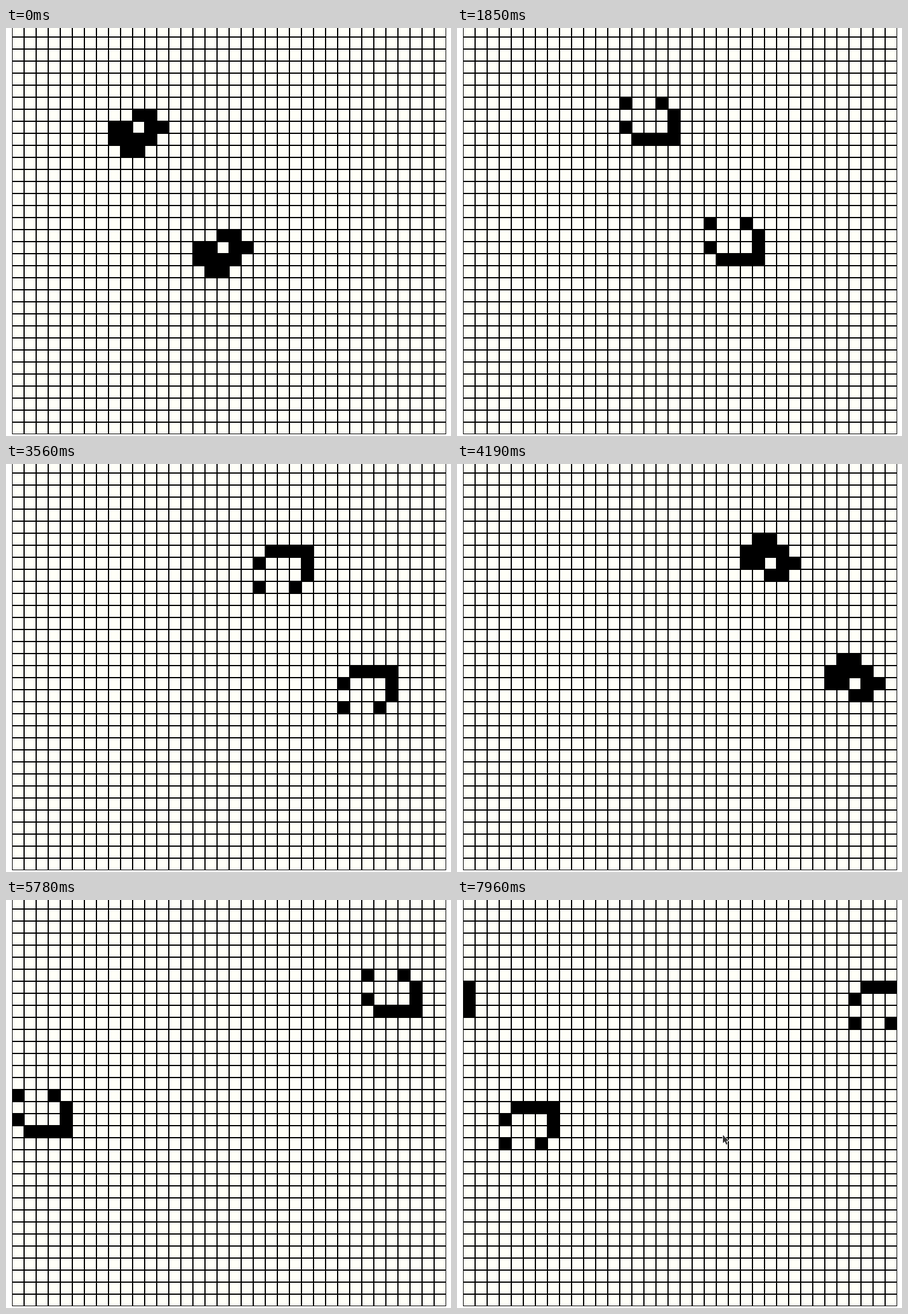
Recreate the animation shown at these times as an HTML page with a canvas. Size 738 by 678 pixels, loop 8 s.

```html
<!DOCTYPE html>
<html>
<head>
<meta charset="utf-8">
<style>
html, body { margin: 0; width: 100%; height: 100%; overflow: hidden; background: #fff; }
canvas { display: block; }
</style>
</head>
<body>
<canvas id="stage" width="738" height="678"></canvas>
<script>
const ctx = document.getElementById('stage').getContext('2d');
const LOOP = 8000, FPS = 27;
const CELL = 20, COLS = 36, LEFT = 10, TOP = 15, BOTTOM = 675;
const LAST_GEN = 49, FRAMES_PER_GEN = 3.315, DELAY = 12.83;

// Two shapes of the spaceship; the other two phases are their mirror images
const full = ['..##.', '##.##', '####.', '.##..'];
const open = ['.####', '#...#', '....#', '#..#.'];

// The life clock is only seen at whole display frames
function generation(t) {
  const frame = Math.floor((t + 5) * FPS / 1000);
  const gen = Math.floor((frame - DELAY) / FRAMES_PER_GEN);
  return Math.max(0, Math.min(LAST_GEN, gen));
}

function drawGrid() {
  for (let x = LEFT; x <= LEFT + COLS * CELL; x += CELL) ctx.fillRect(x - 1, 0, 2, BOTTOM);
  for (let y = TOP; y <= BOTTOM; y += CELL) ctx.fillRect(LEFT, y - 1, COLS * CELL, 2);
}

function drawShip(gen, col, row) {
  const shape = gen % 2 ? open : full;
  const flipped = gen % 4 > 1;
  const rows = flipped ? [...shape].reverse() : shape;
  const x0 = col + (gen >> 1), y0 = row - flipped;
  rows.forEach((line, y) => [...line].forEach((c, x) => {
    if (c === '#') {
      ctx.fillRect(LEFT + (x0 + x) % COLS * CELL - 1, TOP + (y0 + y) * CELL - 1, CELL + 2, CELL + 2);
    }
  }));
}

const arrow = new Path2D('M1 1.5V15L4.1 12.1L6.4 17.4L8.7 16.4L6.5 11.2H10.6Z');

function drawPointer(x, y) {
  ctx.save();
  ctx.translate(x, y);
  ctx.lineWidth = 1.5;
  ctx.lineJoin = 'round';
  ctx.strokeStyle = '#fff';
  ctx.stroke(arrow);
  ctx.fillStyle = '#333';
  ctx.fill(arrow);
  ctx.restore();
}

function draw(t) {
  const gen = generation(t);
  ctx.fillStyle = '#fff';
  ctx.fillRect(0, 0, 738, 678);
  ctx.save();
  ctx.beginPath();
  ctx.rect(LEFT, 0, COLS * CELL, BOTTOM);
  ctx.clip();
  ctx.fillStyle = '#fffff8';
  ctx.fillRect(LEFT, 0, COLS * CELL, BOTTOM);
  ctx.fillStyle = '#000';
  drawGrid();
  drawShip(gen, 8, 6);
  drawShip(gen, 15, 16);
  ctx.restore();
  if (t >= 7960) drawPointer(440, 389);
  else if (t >= 7890) drawPointer(512, 468);
}

const start = performance.now();
function loop() {
  draw((performance.now() - start) % LOOP);
  requestAnimationFrame(loop);
}
loop();
</script>
</body>
</html>
```
